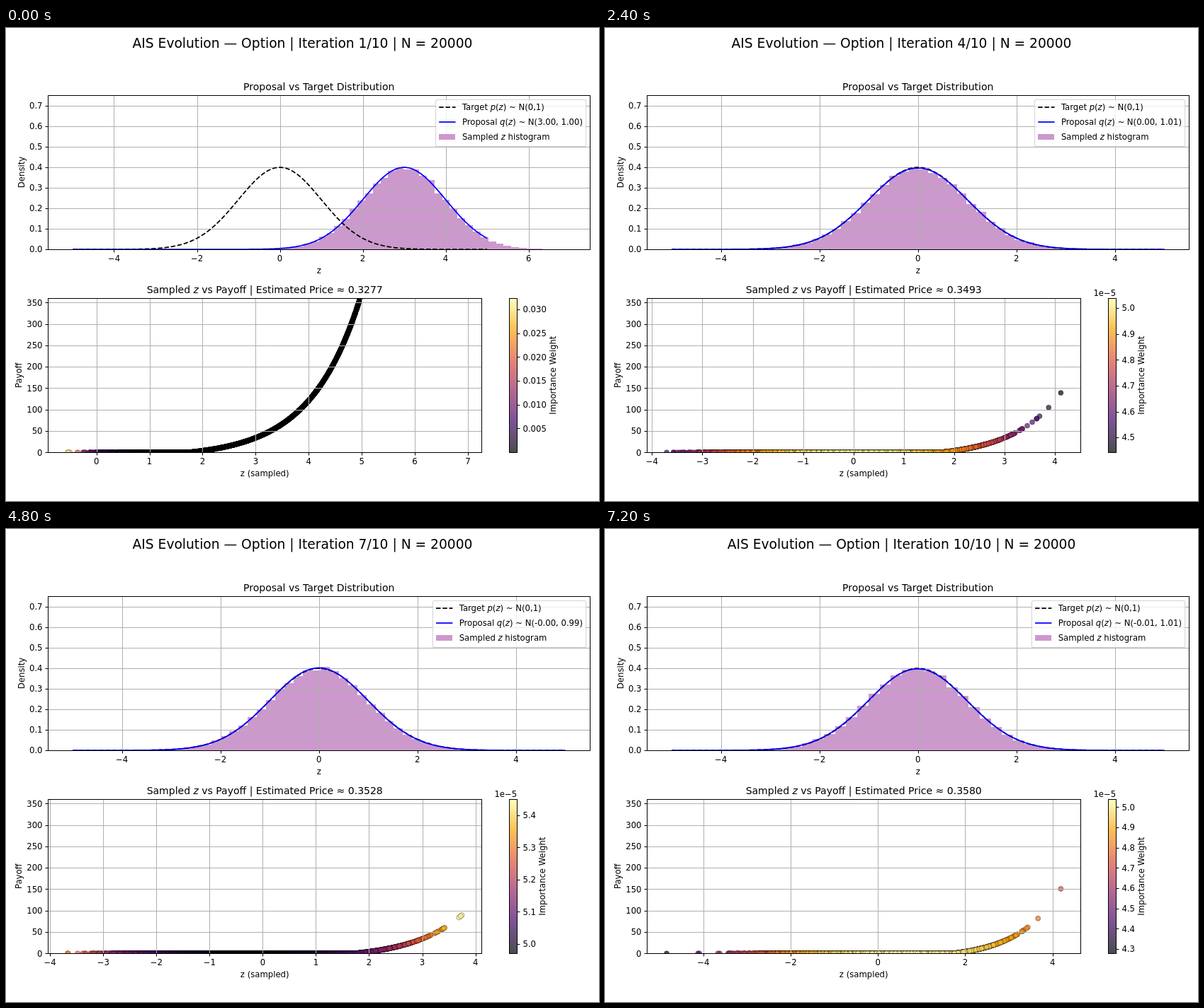
An HTML page with a canvas that plays this animation: 837x669 px, repeating every 8 s.

```html
<!DOCTYPE html>
<html lang="en">
<head>
<meta charset="utf-8">
<title>Adaptive importance sampling</title>
<style>
  html, body { margin: 0; width: 100%; height: 100%; overflow: hidden; background: #fff; }
  canvas { display: block; }
</style>
</head>
<body>
<canvas id="stage" width="837" height="669"></canvas>
<script>
const ctx = document.getElementById('stage').getContext('2d');
const STEP_MS = 800, BINS = 40, SAMPLES = 20000, SPOTS = 4000;
const EM = 11.67, TITLE = 14, HEAD = 18.67, LINE = 1.75, DASH = [6.46, 2.8];
const GRID = '#b0b0b0', PURPLE = 'rgb(204,153,204)';
const TOP = { l: 59.2, r: 824.2, t: 95.1, b: 313.1 };
const LOW = { l: 59.2, r: 671.2, t: 382.2, b: 600.2 };
const BAR = { l: 710.2, r: 721.2, t: 382.2, b: 600.2 };

// proposal mean and deviation, estimated price, smallest and largest sample
const scenes = [
  [3, 1, 0.3277, -0.543, 6.886],
  [0.482, 0.7095, 0.3871, -2.91, 3.643],
  [0.03, 0.97, 0.3452, -3.6, 3.9],
  [0, 1.0075, 0.3493, -3.71, 4.119],
  [0.008, 1.0015, 0.3391, -3.77, 3.96],
  [0.0069, 0.9995, 0.3298, -4.33, 4.156],
  [-0.0029, 0.9943, 0.3528, -3.669, 3.744],
  [0.001, 1, 0.3417, -4.1, 4.02],
  [0, 0.9978, 0.3334, -3.97, 4.69],
  [-0.007, 1.0055, 0.358, -4.843, 4.19]
].map(([mu, sd, price, min, max], i) => ({ i, mu, sd, price, min, max }));

const inferno = [[0, 0, 4], [66, 10, 104], [147, 38, 103], [221, 81, 58], [252, 165, 10], [252, 255, 164]];

function heat(t) {
  const p = Math.max(0, Math.min(0.9999, t)) * (inferno.length - 1), k = Math.floor(p);
  const c = inferno[k].map((v, j) => Math.round(v + (inferno[k + 1][j] - v) * (p - k)));
  return `rgba(${c},0.7)`;
}

function seeded(seed) {
  let s = seed * 7919 + 17;
  return () => {
    s = (s + 0x6D2B79F5) | 0;
    let t = Math.imul(s ^ (s >>> 15), 1 | s);
    t = (t + Math.imul(t ^ (t >>> 7), 61 | t)) ^ t;
    return ((t ^ (t >>> 14)) >>> 0) / 4294967296;
  };
}

const normal = (z, mu, sd) => Math.exp(-(((z - mu) / sd) ** 2) / 2) / (sd * Math.sqrt(2 * Math.PI));
const payoff = z => Math.max(0, 1.92 * Math.exp(1.06 * z) - 12.2);
const scale = (a, b, p, q) => v => p + (v - a) / (b - a) * (q - p);
const snap = v => Math.floor(v + 0.5) + 0.5;
const middle = box => (box.l + box.r) / 2;

// Importance weights, normalised over the range that was sampled.
function weights(s) {
  const ratio = z => normal(z, 0, 1) / normal(z, s.mu, s.sd);
  const n = 400, dz = (s.max - s.min) / n;
  let lo = Infinity, hi = 0, mass = 0;
  for (let k = 0; k <= n; k++) {
    const z = s.min + k * dz, r = ratio(z);
    lo = Math.min(lo, r);
    hi = Math.max(hi, r);
    mass += normal(z, 0, 1) * dz;
  }
  const sum = SAMPLES * mass;
  return { lo: lo / sum, hi: hi / sum, at: z => ratio(z) / sum };
}

// Round tick values: the finest 1-2-5 step that gives at most nine intervals.
function ticks(a, b) {
  const raw = (b - a) / 9, unit = 10 ** Math.floor(Math.log10(raw));
  const step = [1, 2, 5, 10].find(m => m * unit >= raw) * unit;
  const digits = Math.max(0, -Math.floor(Math.log10(step) + 1e-9));
  const out = [];
  for (let k = Math.ceil(a / step); k * step <= b; k++) {
    out.push({ v: k * step, label: (k * step).toFixed(digits).replace('-', '\u2212') });
  }
  return out;
}

// Text between asterisks is set in italics.
function layout(str, size) {
  let width = 0;
  const runs = str.split('*').map((s, k) => {
    const font = `${k % 2 ? 'italic ' : ''}${size}px "DejaVu Sans", sans-serif`;
    ctx.font = font;
    const run = { s, font, x: width };
    width += ctx.measureText(s).width;
    return run;
  });
  return { runs, width };
}

function text(str, x, y, align = 0, size = EM, turn = 0) {
  const { runs, width } = layout(str, size);
  ctx.save();
  ctx.translate(x, y);
  ctx.rotate(turn);
  ctx.fillStyle = '#000';
  for (const run of runs) {
    ctx.font = run.font;
    ctx.fillText(run.s, run.x - width * align, 0);
  }
  ctx.restore();
  return width;
}

const upright = (str, x, y) => text(str, x, y, 0.5, EM, -Math.PI / 2);

function line(x1, y1, x2, y2, color = '#000', width = 1) {
  ctx.strokeStyle = color;
  ctx.lineWidth = width;
  ctx.beginPath();
  ctx.moveTo(x1, y1);
  ctx.lineTo(x2, y2);
  ctx.stroke();
}

function dashed(draw) {
  ctx.setLineDash(DASH);
  draw();
  ctx.setLineDash([]);
}

function clipped(box, draw) {
  ctx.save();
  ctx.beginPath();
  ctx.rect(box.l, box.t, box.r - box.l, box.b - box.t);
  ctx.clip();
  draw();
  ctx.restore();
}

function frame(box) {
  const l = snap(box.l), t = snap(box.t);
  ctx.strokeStyle = '#000';
  ctx.lineWidth = 1;
  ctx.strokeRect(l, t, snap(box.r) - l, snap(box.b) - t);
}

function axes(box, a, b, top) {
  const X = scale(a, b, box.l, box.r), Y = scale(0, top, box.b, box.t);
  const xs = ticks(a, b), ys = ticks(0, top);
  const bottom = snap(box.b), left = snap(box.l);
  return {
    X, Y,
    grid() {
      for (const { v } of xs) line(snap(X(v)), box.t, snap(X(v)), box.b, GRID);
      for (const { v } of ys) line(box.l, snap(Y(v)), box.r, snap(Y(v)), GRID);
    },
    edge() {
      for (const { v, label } of xs) {
        line(snap(X(v)), bottom, snap(X(v)), bottom + 4);
        text(label, X(v), bottom + 16.5, 0.5);
      }
      for (const { v, label } of ys) {
        line(left - 4, snap(Y(v)), left, snap(Y(v)));
        text(label, left - 8, Math.round(Y(v) + 4.3), 1);
      }
      frame(box);
    }
  };
}

function curve({ X, Y }, mu, sd, color) {
  ctx.strokeStyle = color;
  ctx.lineWidth = LINE;
  ctx.beginPath();
  for (let k = 0; k <= 500; k++) {
    const z = -5 + k / 50;
    ctx.lineTo(X(z), Y(normal(z, mu, sd)));
  }
  ctx.stroke();
}

function histogram(s, { X, Y }) {
  const rnd = seeded(s.i + 1), w = (s.max - s.min) / BINS;
  ctx.fillStyle = PURPLE;
  for (let k = 0; k < BINS; k++) {
    const z = s.min + k * w, q = normal(z + w / 2, s.mu, s.sd);
    const noise = (rnd() + rnd() + rnd() + rnd() - 2) * Math.sqrt(q / (SAMPLES * w));
    const l = Math.round(X(z)), t = Math.round(Y(Math.max(0, q + noise)));
    ctx.fillRect(l, t, Math.round(X(z + w)) - l, Math.round(TOP.b) - t);
  }
}

function legend(s) {
  const label = `Proposal *q*(*z*) ~ N(${s.mu.toFixed(2)}, ${s.sd.toFixed(2)})`;
  const tx = 814 - layout(label, EM).width, x = tx - 2.8 * EM, l = x - 0.4 * EM, w = 2 * EM;
  ctx.beginPath();
  ctx.roundRect(l, 101.5, 818.7 - l, 66, 2.3);
  ctx.fillStyle = 'rgba(255,255,255,0.8)';
  ctx.fill();
  ctx.strokeStyle = 'rgba(204,204,204,0.8)';
  ctx.lineWidth = 1.1;
  ctx.stroke();
  dashed(() => line(x, 112, x + w, 112, '#000', LINE));
  line(x, 133, x + w, 133, '#00f', LINE);
  ctx.fillStyle = PURPLE;
  ctx.fillRect(Math.round(x), 150, Math.round(w), 8);
  ['Target *p*(*z*) ~ N(0,1)', label, 'Sampled *z* histogram'].forEach((s, k) => text(s, tx, 116 + 21 * k));
}

function drawDensity(s) {
  const a = Math.min(-5, s.min), b = Math.max(5, s.max), m = (b - a) / 20;
  const ax = axes(TOP, a - m, b + m, 0.75), cx = middle(TOP);
  clipped(TOP, () => {
    histogram(s, ax);
    ax.grid();
    dashed(() => curve(ax, 0, 1, '#000'));
    curve(ax, s.mu, s.sd, '#00f');
  });
  ax.edge();
  text('Proposal vs Target Distribution', cx, 88, 0.5, TITLE);
  text('z', cx, 347, 0.5);
  upright('Density', 25.6, 204);
  legend(s);
}

// Even candidates, thinned where the proposal is sparse.
function samples(s) {
  const rnd = seeded(s.i + 31), span = s.max - s.min, out = [s.min, s.max];
  for (let k = 0; k < SPOTS; k++) {
    const z = s.min + rnd() * span;
    if (rnd() * SPOTS / span < SAMPLES * normal(z, s.mu, s.sd)) out.push(z);
  }
  return out;
}

function scatter(s, { X, Y }, w) {
  ctx.strokeStyle = 'rgba(0,0,0,0.7)';
  ctx.lineWidth = 0.5;
  for (const z of samples(s)) {
    ctx.beginPath();
    ctx.arc(X(z), Y(payoff(z)), 3.5, 0, 2 * Math.PI);
    ctx.fillStyle = heat((w.at(z) - w.lo) / (w.hi - w.lo));
    ctx.fill();
    ctx.stroke();
  }
}

function drawPayoff(s, w) {
  const m = (s.max - s.min) / 20, cx = middle(LOW);
  const ax = axes(LOW, s.min - m, s.max + m, 360);
  clipped(LOW, () => {
    scatter(s, ax, w);
    ax.grid();
  });
  ax.edge();
  text(`Sampled *z* vs Payoff | Estimated Price ≈ ${s.price.toFixed(4)}`, cx, 375, 0.5, TITLE);
  text('z (sampled)', cx, 634, 0.5);
  upright('Payoff', 21.9, 491.2);
}

function drawColorbar(w) {
  const fade = ctx.createLinearGradient(0, BAR.b, 0, BAR.t);
  for (let k = 0; k <= 20; k++) fade.addColorStop(k / 20, heat(k / 20));
  ctx.fillStyle = fade;
  ctx.fillRect(BAR.l, BAR.t, BAR.r - BAR.l, BAR.b - BAR.t);
  frame(BAR);
  const tiny = w.hi < 1e-3, unit = tiny ? 1e5 : 1;
  const lo = w.lo * unit, hi = w.hi * unit, Y = scale(lo, hi, BAR.b, BAR.t), right = snap(BAR.r);
  let wide = 0;
  for (const { v, label } of ticks(lo, hi)) {
    line(right, snap(Y(v)), right + 4, snap(Y(v)));
    wide = text(label, right + 8, Math.round(Y(v) + 4.3));
  }
  if (tiny) text('1e\u22125', BAR.r, 379, 1);
  upright('Importance Weight', right + wide + 21, 491.2);
}

function draw(s) {
  const w = weights(s);
  ctx.fillStyle = '#fff';
  ctx.fillRect(0, 0, 837, 669);
  text(`AIS Evolution — Option | Iteration ${s.i + 1}/10 | N = ${SAMPLES}`, 418.5, 28, 0.5, HEAD);
  drawDensity(s);
  drawPayoff(s, w);
  drawColorbar(w);
}

let shown = -1;
function tick(now) {
  const i = Math.floor(now / STEP_MS) % scenes.length;
  if (i !== shown) draw(scenes[shown = i]);
  requestAnimationFrame(tick);
}
tick(performance.now());
</script>
</body>
</html>
```
